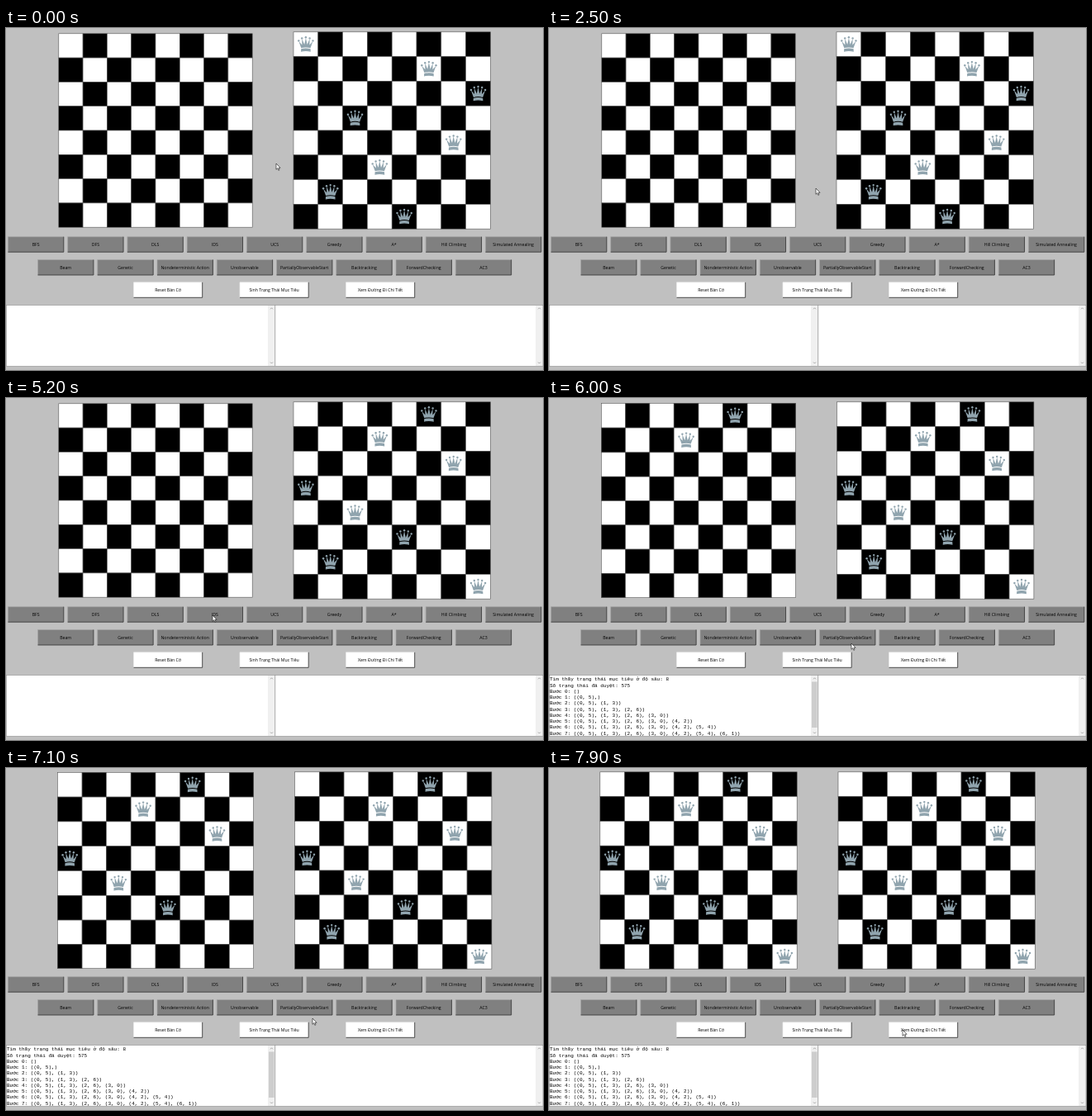
An HTML page for the animation above (8000 ms loop, 650 by 414 pixels).

```html
<!DOCTYPE html>
<html lang="vi">
<head>
<meta charset="utf-8">
<title>Eight queens search</title>
<style>
  html, body { margin: 0; width: 100%; height: 100%; overflow: hidden; background: #c0c0c0; }
  svg { display: block; width: 650px; height: 414px; }
  .label { font: 5.2px "Open Sans", "Noto Sans", sans-serif; text-anchor: middle; }
  .log { font: 6px "Liberation Mono", "DejaVu Sans Mono", monospace; white-space: pre; }
</style>
</head>
<body>
<svg id="stage" viewBox="0 0 650 414">
  <defs>
    <g id="queen" fill="#90a4ae">
      <path d="M-5.6 4.6L-8.6-3.8L-4.5 .8L-4.7-6.8L-1.7 .2L0-7.8L1.7 .2L4.7-6.8L4.5 .8L8.6-3.8L5.6 4.6Q0 2.9-5.6 4.6Z"/>
      <path d="M-5.7 5.6Q0 3.9 5.7 5.6L5.9 9Q0 7.6-5.9 9Z"/>
      <circle cx="-8.6" cy="-4.3" r="1.2"/>
      <circle cx="-4.7" cy="-7.3" r="1.2"/>
      <circle cx="0" cy="-8.4" r="1.2"/>
      <circle cx="4.7" cy="-7.3" r="1.2"/>
      <circle cx="8.6" cy="-4.3" r="1.2"/>
    </g>
    <clipPath id="logClip"><rect x="0" y="336" width="317" height="73"/></clipPath>
  </defs>
  <g id="ui"></g>
  <g id="left"></g>
  <g id="right"></g>
  <g id="log" clip-path="url(#logClip)"></g>
  <rect id="thumb" x="318" y="343.5" width="6.6" height="55.5" fill="#cdcdcd"/>
  <path id="cursor" d="M0 0V7.3L1.7 5.7L2.8 8.3L4 7.8L2.9 5.3H5.1Z" fill="#fff" stroke="#111" stroke-width=".6"/>
</svg>
<script>
const LOOP = 8000, TICK = 100;
const SHUFFLE_AT = 3800, SEARCH_AT = 5300, STEP = 300;
const FIRST = [0, 5, 7, 2, 6, 3, 1, 4];
const GOAL = [5, 3, 6, 0, 2, 4, 1, 7];

// time, x, y of the pointer tip
const POINTER = [
  [0, 327, 164], [100, 326, 140], [200, 325, 123], [300, 323, 149], [700, 323, 149],
  [800, 327, 149], [2400, 327, 149], [2500, 323, 194], [2600, 323, 194],
  [3300, 325, 313], [3600, 325, 313], [3700, 325, 311], [4000, 325, 311],
  [4200, 325, 223], [4300, 325, 223], [4900, 250, 263], [5300, 250, 263],
  [5900, 356, 296], [6000, 366, 297], [7100, 371, 303], [7700, 422, 321],
  [7900, 428, 317]
];

const NS = "http://www.w3.org/2000/svg";
const $ = id => document.getElementById(id);

function add(parent, tag, attrs, text) {
  const el = document.createElementNS(NS, tag);
  for (const k in attrs) el.setAttribute(k, attrs[k]);
  if (text) el.textContent = text;
  parent.appendChild(el);
  return el;
}

function button(x, y, w, text, fill, light) {
  const h = 18.5, ui = $("ui");
  add(ui, "rect", { x, y, width: w, height: h, fill });
  add(ui, "path", { d: `M${x} ${y + h}V${y}H${x + w}`, fill: "none", stroke: light, "stroke-width": .7 });
  add(ui, "path", { d: `M${x} ${y + h}H${x + w}V${y}`, fill: "none", stroke: "#3c3c3c", "stroke-width": .9 });
  add(ui, "text", { x: x + w / 2, y: y + 11, class: "label" }, text);
}

function buttonRow(names, x, y, w, pitch, fill, light) {
  names.forEach((name, i) => button(x + i * pitch, y, w, name, fill, light));
}

function textArea(x, w) {
  const ui = $("ui"), bar = x + w - 9, mid = bar + 4.5;
  add(ui, "rect", { x: x + .3, y: 335.5, width: w - .6, height: 74, fill: "#fff", stroke: "#9a9a9a", "stroke-width": .7 });
  add(ui, "rect", { x: bar, y: 336, width: 8.5, height: 73, fill: "#f0f0f0" });
  add(ui, "path", {
    d: `M${mid - 1.5} 340.3l1.5-1.5l1.5 1.5M${mid - 1.5} 404.5l1.5 1.5l1.5-1.5`,
    fill: "none", stroke: "#8a8a8a", "stroke-width": .7
  });
}

// Rows and columns that hold a queen are slightly larger.
function drawBoard(group, queens, cx, cy) {
  group.textContent = "";
  const edges = has => {
    const out = [0];
    for (let i = 0; i < 8; i++) out.push(out[i] + (has(i) ? 29.8 : 29.3));
    return out;
  };
  const xs = edges(i => queens.includes(i));
  const ys = edges(i => i < queens.length);
  const x0 = cx - xs[8] / 2, y0 = cy - ys[8] / 2;
  for (let r = 0; r < 8; r++) {
    for (let c = 0; c < 8; c++) {
      add(group, "rect", {
        x: x0 + xs[c], y: y0 + ys[r],
        width: xs[c + 1] - xs[c], height: ys[r + 1] - ys[r],
        fill: (r + c) % 2 ? "#000" : "#fff", stroke: "#555", "stroke-width": .6
      });
    }
  }
  queens.forEach((c, r) => {
    const x = x0 + (xs[c] + xs[c + 1]) / 2, y = y0 + (ys[r] + ys[r + 1]) / 2;
    add(group, "use", { href: "#queen", transform: `translate(${x} ${y})` });
  });
}

function tuple(n) {
  const items = GOAL.slice(0, n).map((c, r) => `(${r}, ${c})`);
  return `(${items.join(", ")}${n === 1 ? "," : ""})`;
}

function writeLog() {
  const lines = ["Tìm thấy trạng thái mục tiêu ở độ sâu: 8", "Số trạng thái đã duyệt: 575"];
  for (let n = 0; n <= 8; n++) lines.push(`Bước ${n}: ${tuple(n)}`);
  lines.forEach((line, i) => add($("log"), "text", { x: 1, y: 342.4 + i * 7.25, class: "log" }, line));
}

function pointerAt(t) {
  let i = POINTER.findIndex(p => p[0] > t);
  if (i < 0) i = POINTER.length;
  const a = POINTER[i - 1], b = POINTER[i] || a;
  const k = a === b ? 0 : (t - a[0]) / (b[0] - a[0]);
  return [a[1] + (b[1] - a[1]) * k, a[2] + (b[2] - a[2]) * k];
}

let shown = "";
function render(time) {
  const t = Math.floor((time % LOOP) / TICK) * TICK;
  const searching = t >= SEARCH_AT;
  const placed = searching ? Math.min(8, Math.floor((t - SEARCH_AT) / STEP)) : 0;
  const shuffled = t >= SHUFFLE_AT;
  const key = placed + "/" + shuffled;
  if (key !== shown) {
    shown = key;
    drawBoard($("left"), GOAL.slice(0, placed), 181, 124);
    drawBoard($("right"), shuffled ? GOAL : FIRST, 467.2 + placed * .25, 124);
  }
  const visibility = searching ? "visible" : "hidden";
  $("log").setAttribute("visibility", visibility);
  $("thumb").setAttribute("visibility", visibility);
  $("cursor").setAttribute("transform", `translate(${pointerAt(t)})`);
}

buttonRow(["BFS", "DFS", "DLS", "IDS", "UCS", "Greedy", "A*", "Hill Climbing", "Simulated Annealing"],
  2.4, 252.7, 67.4, 72.25, "#808080", "#a8a8a8");
buttonRow(["Beam", "Genetic", "Nondeterministic Action", "Unobservable", "PartiallyObservableStart",
  "Backtracking", "ForwardChecking", "AC3"], 38.5, 280.5, 67.4, 72.25, "#808080", "#a8a8a8");
buttonRow(["Reset Bàn Cờ", "Sinh Trạng Thái Mục Tiêu", "Xem Đường Đi Chi Tiết"],
  154.5, 307.8, 83.2, 128.5, "#fff", "#e8e8e8");
textArea(0, 326);
textArea(325.5, 324.5);
writeLog();

const start = performance.now();
function frame() {
  render(performance.now() - start);
  requestAnimationFrame(frame);
}
frame();
</script>
</body>
</html>
```
